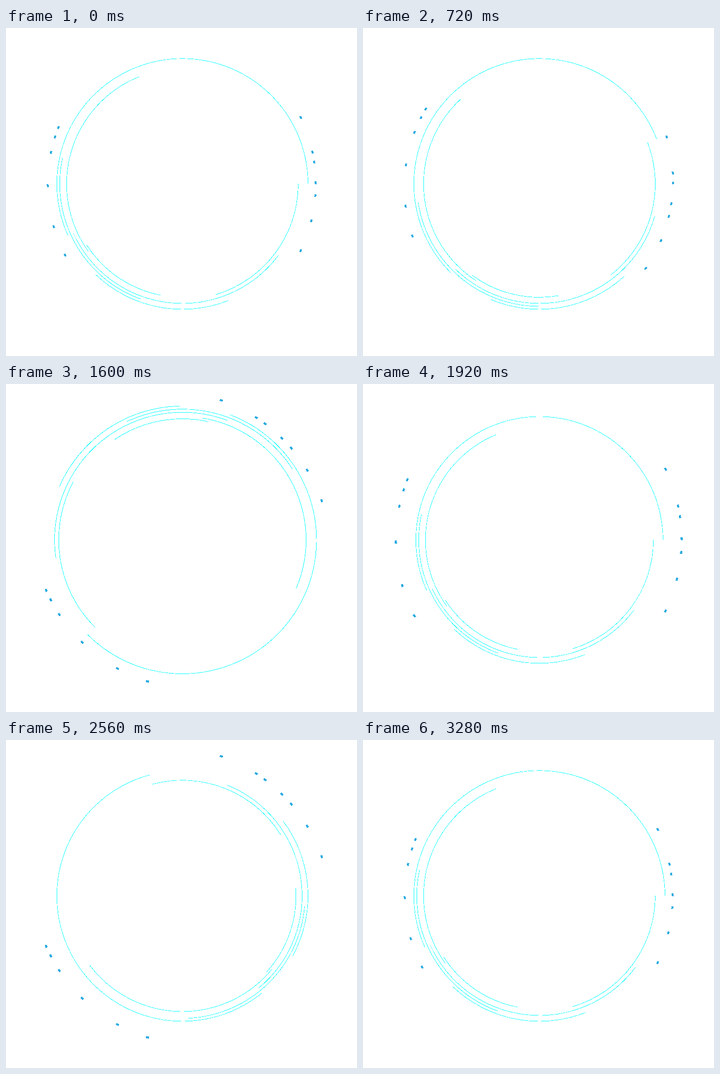
An HTML page that plays this animation: 720 px wide and 674 px high, repeating every 3.36 s.

```html
<!DOCTYPE html>
<html lang="en">
<head>
<meta charset="utf-8">
<title>Rotating dial</title>
<style>
  html, body { margin: 0; width: 100%; height: 100%; overflow: hidden; background: #fff; }
  svg { display: block; width: 720px; height: 674px; shape-rendering: crispEdges; }
  path { fill: #0ff; }
  rect { fill: #29abe2; }
</style>
</head>
<body>
<svg viewBox="0 0 720 674"><g id="arcs"></g><g id="dots"></g></svg>
<script>
const STEP = 80, LOOP = 3360, LINE = .85;
const arcGroup = document.getElementById('arcs');
const dotGroup = document.getElementById('dots');

function add(parent, tag, attrs) {
  const node = document.createElementNS('http://www.w3.org/2000/svg', tag);
  for (const name in attrs) node.setAttribute(name, attrs[name]);
  parent.append(node);
}

function polar(r, deg) {
  const a = deg * Math.PI / 180;
  return `${r * Math.cos(a)} ${r * Math.sin(a)}`;
}

// A filled sliver keeps the thin line in full colour, with hard pixel edges
function addArc(r, from, to) {
  const inner = r - LINE / 2, outer = r + LINE / 2;
  const large = to - from > 180 ? 1 : 0;
  add(arcGroup, 'path', {
    d: `M${polar(outer, from)}A${outer} ${outer} 0 ${large} 1 ${polar(outer, to)}` +
       `L${polar(inner, to)}A${inner} ${inner} 0 ${large} 0 ${polar(inner, from)}Z`
  });
}

// Dots lie on two flattened sides: the radius grows away from the horizontal
function addDot(side, tilt) {
  const r = 275 + .0055 * tilt * tilt;
  add(dotGroup, 'rect', {
    x: r - 2, y: -2.9, width: 4, height: 5.8,
    transform: `rotate(${side + tilt})`
  });
}

addArc(257.6, 155.8, 360);
addArc(257.6, 68.4, 133.7);
addArc(251.6, 110, 192.2);
addArc(245.6, 36.7, 155.5);
addArc(237.6, 144.2, 248);
addArc(237.6, 0, 73.2);
addArc(233, 101, 147.3);

for (const tilt of [-29.2, -13.7, -9.4, -.5, 5, 15.9, 29.3]) addDot(0, tilt);
for (const tilt of [-31.4, -18.5, -.8, 13.6, 20.4, 24.6]) addDot(180, tilt);

// Rises from 0 to 1 after start, falls back to 0 by end
function pulse(step, start, end, ramp) {
  return Math.max(0, Math.min(1, (step - start) / ramp, (end - step) / ramp));
}

function place(group, cx, cy, turn, scale) {
  group.setAttribute('transform', `translate(${cx} ${cy}) rotate(${turn}) scale(${scale})`);
}

function draw() {
  const step = Math.floor(performance.now() % LOOP / STEP);
  const swing = pulse(step, 0, 10, 5);
  const spin = pulse(step, 14, 23, 3);
  const tilt = pulse(step, 28, 37, 3);
  const spread = pulse(step, 14, 37, 3);
  const shrink = pulse(step, 20, 27, 3);

  place(dotGroup, 360.5, 320.5, 45 * (swing - spin - tilt), 1 + .066 * spread);
  place(arcGroup, 361.9, 320.4, 135 * spin - 105 * (swing + tilt), 1 + .068 * spin - .016 * shrink);
  requestAnimationFrame(draw);
}
draw();
</script>
</body>
</html>
```
